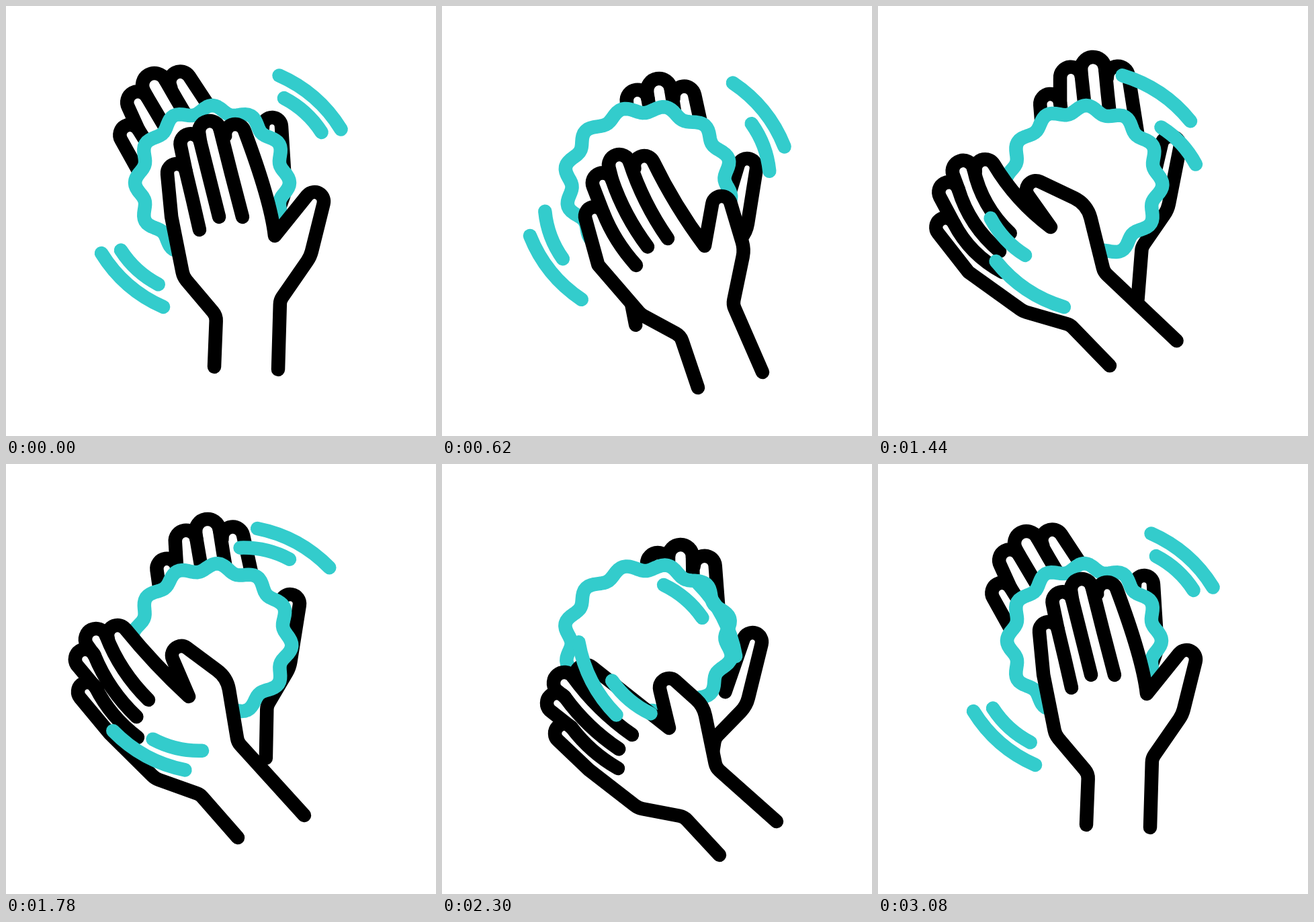
These frames come from a looping animation (640 by 640 pixels, 3.6 s). An HTML page with a canvas:

```html
<!DOCTYPE html>
<html lang="en">
<head>
<meta charset="utf-8">
<title>Washing hands</title>
<style>
html, body { margin: 0; width: 100%; height: 100%; overflow: hidden; background: #fff; }
canvas { display: block; width: 640px; height: 640px; }
</style>
</head>
<body>
<canvas id="stage" width="640" height="640"></canvas>
<script>
const ctx = document.getElementById('stage').getContext('2d');
const LOOP = 3600, MOVE = 3080;
const TEAL = '#33cccc', RAD = Math.PI / 180;

// Every track has one row per pose; the last time returns to the first row.
const TIMES = [0, 620, 1100, 1780, 2300, 2760, MOVE];

// left wrist, left corner, palm corner, right corner, right wrist
const palm = [
  [310,537, 313,461, 264,403, 408,438, 405,541],
  [381,568, 355,491, 296,459, 433,444, 477,545],
  [372,542, 315,483, 244,466, 363,408, 470,501],
  [345,556, 289,492, 222,468, 345,414, 444,523],
  [413,582, 360,525, 292,512, 408,452, 498,532],
  [364,567, 352,492, 290,447, 440,455, 457,551]
];
// tips of pinky, middle, index; their ends; bulge of edge, fingers, index
const fingers = [
  [254,249, 303,187, 341,191, 288,333, 352,314, 400,342, 12,0,6],
  [227,313, 264,237, 301,238, 289,386, 336,346, 391,357, 26,9,-7],
  [120,344, 158,257, 192,257, 211,408, 224,352, 283,341, 28,20,-18],
  [121,339, 134,261, 166,255, 196,407, 212,351, 272,346, 12,12,-5],
  [182,401, 182,326, 214,314, 262,453, 283,403, 338,393, 12,10,0],
  [248,298, 283,224, 322,225, 300,373, 358,341, 411,358, 11,1,6]
];
// tip, base
const thumb = [
  [459,291, 453,373], [416,297, 450,362], [259,291, 335,306],
  [261,285, 329,318], [338,333, 389,360], [457,297, 467,395]
];

// Back hand: fixed shape around the middle fingertip
const backPalm = [-77,342, -80,300, -70,250, 56,269, 45,346];
const backFingers = [-67,48, 0,0, 36,14, -45,150, 25,140, 70,200, 12,0,0];
// middle tip, turn, thumb tip
const back = [
  [221,118, -28, 396,180], [323,126, -7, 454,241], [345,129, 0, 454,251],
  [300,100, -7, 423,208], [355,138, 1, 462,265], [267,115, -18, 426,200]
];

const foamTurn = [[0], [12], [2], [4], [13], [0]];

// distance, bearing, tilt
const outer = [[187,135,41], [189,143,51], [100,129,45],
  [185,125.5,28.5], [99,153.8,62.6], [180,182.4,102.7]];
const inner = [[166,137,42.3], [167,157,69.4], [82.4,186,83],
  [156.6,114.5,13.1], [81,118.3,40.4], [165,166.2,81]];

// Smooth curve through a track, at rest on both ends
function at(track, t) {
  const last = TIMES.length - 1;
  let i = 0;
  while (i < last - 1 && t >= TIMES[i + 1]) i++;
  const row = k => track[k % track.length];
  const span = TIMES[i + 1] - TIMES[i];
  const u = Math.min(1, (t - TIMES[i]) / span), v = 1 - u;
  const slope = (k, j) => k === 0 || k === last ? 0 :
    (row(k + 1)[j] - row(k - 1)[j]) / (TIMES[k + 1] - TIMES[k - 1]);
  return row(i).map((p, j) =>
    v * v * (1 + 2 * u) * p + u * u * (3 - 2 * u) * row(i + 1)[j] +
    span * u * v * (v * slope(i, j) - u * slope(i + 1, j)));
}

// Swell between pose k and the next one
function hump(t, k) {
  const u = (t - TIMES[k]) / (TIMES[k + 1] - TIMES[k]);
  return u > 0 && u < 1 ? Math.sin(Math.PI * u) ** 2 : 0;
}

const pairs = list => Array.from({ length: Math.floor(list.length / 2) },
  (_, i) => [list[2 * i], list[2 * i + 1]]);

// Midpoint of a and b, shifted along the line and sideways
function between(a, b, along, side) {
  const dx = b[0] - a[0], dy = b[1] - a[1], d = Math.hypot(dx, dy);
  return [(a[0] + b[0]) / 2 + (dx * along + dy * side) / d,
    (a[1] + b[1]) / 2 + (dy * along - dx * side) / d];
}

function build(palmRow, fingerRow, thumbRow) {
  const [wristL, cornerL, heel, cornerR, wristR] = pairs(palmRow);
  const [pinky, middle, index, endP, endM, crease] = pairs(fingerRow);
  const [edge, bow, indexBow] = fingerRow.slice(12);
  const ring = between(pinky, middle, 7.5, 11), endR = between(endP, endM, 0, 10);
  const finger = (top, end) => ({ top, end, bend: between(top, end, 0, 7.5 - bow) });
  const bend = between(index, crease, Math.max(0, 5 * indexBow), 7.5 + indexBow);
  const [thumbTip, thumbBase] = pairs(thumbRow);
  return {
    wristL, cornerL, heel, cornerR, wristR, thumbTip, thumbBase,
    edge: between(pinky, heel, -13, -edge),
    fingers: [finger(pinky, endP), finger(ring, endR), finger(middle, endM),
      { top: index, end: crease, bend }]
  };
}

// Heading from p along the tangent of a fingertip circle
function aim(p, c, r, side) {
  const dx = c[0] - p[0], dy = c[1] - p[1];
  return Math.atan2(dy, dx) + side * Math.asin(Math.min(1, r / Math.hypot(dx, dy)));
}

function tip(c, r, from, to) {
  const end = aim(to, c, r, 1) + Math.PI / 2;
  ctx.arc(c[0], c[1], r, aim(from, c, r, -1) - Math.PI / 2, end);
  return [c[0] + r * Math.cos(end), c[1] + r * Math.sin(end)];
}

function drawHand(h, radii) {
  const gaps = [];
  let from = h.edge;
  ctx.beginPath();
  ctx.moveTo(...h.wristL);
  ctx.arcTo(...h.cornerL, ...h.heel, 20);
  ctx.arcTo(...h.heel, ...h.edge, 28);
  ctx.lineTo(...h.edge);
  h.fingers.forEach((f, i) => {
    const side = tip(f.top, radii[i], from, f.bend);
    gaps.push([side, f.bend, f.end]);
    from = f.bend;
  });
  const [, bend, crease] = gaps.pop();
  ctx.quadraticCurveTo(...bend, ...crease);
  tip(h.thumbTip, 14, crease, h.thumbBase);
  ctx.arcTo(...h.thumbBase, ...h.cornerR, 45);
  ctx.arcTo(...h.cornerR, ...h.wristR, 20);
  ctx.lineTo(...h.wristR);
  ctx.fill();
  ctx.strokeStyle = '#000';
  ctx.stroke();
  ctx.beginPath();
  for (const [a, b, c] of gaps) {
    ctx.moveTo(...a);
    ctx.quadraticCurveTo(...b, ...c);
  }
  ctx.stroke();
}

function drawBack(t) {
  const [x, midY, turn, tx, ty] = at(back, t);
  const lift = 6 * hump(t, 0) + 18 * hump(t, 3 - 1);
  const y = midY - lift;
  const c = Math.cos(turn * RAD), s = Math.sin(turn * RAD);
  const place = list => pairs(list).flatMap(([a, b]) => [x + a * c - b * s, y + a * s + b * c]);
  const tips = [...place(backFingers.slice(0, 12)), ...backFingers.slice(12)];
  const ty2 = ty - lift;
  drawHand(build(place(backPalm), tips, [tx, ty2, tx - 8 - turn, ty2 + 95]), [15, 16, 18, 16]);
}

function drawFront(t) {
  const a = hump(t, 1), b = hump(t, 2);
  ctx.save();
  ctx.translate(6 * a - 8 * b, 11 * a - 10 * b);
  drawHand(build(at(palm, t), at(fingers, t), at(thumb, t)), [14, 15, 16, 15]);
  ctx.restore();
}

function drawFoam(t) {
  const [turn] = at(foamTurn, t), wide = 1 + turn / 130;
  ctx.beginPath();
  for (let d = 0; d < 360; d += 2) {
    const r = 109.5 + 5.5 * Math.cos(12 * d * RAD), a = (d + turn) * RAD;
    ctx.lineTo(307 + wide * r * Math.cos(a), 263 + r * Math.sin(a));
  }
  ctx.closePath();
  ctx.fill();
  ctx.strokeStyle = TEAL;
  ctx.stroke();
}

// A curved dash and its twin across the centre
function drawDashes(track, half, bulge, t) {
  const [dist, bearing, tilt] = at(track, t);
  const swell = 20 * hump(t, 1) + 25 * hump(t, 2);
  for (const flip of [0, 180]) {
    ctx.save();
    ctx.translate(320.3, 275.7);
    ctx.rotate((bearing + flip) * RAD);
    ctx.translate(dist + swell, 0);
    ctx.rotate((tilt - bearing) * RAD);
    ctx.beginPath();
    ctx.moveTo(-half, 0);
    ctx.quadraticCurveTo(0, 2 * bulge, half, 0);
    ctx.stroke();
    ctx.restore();
  }
}

function frame(now) {
  const t = Math.min(now % LOOP, MOVE);
  ctx.fillStyle = '#fff';
  ctx.fillRect(0, 0, 640, 640);
  ctx.lineWidth = 20.5;
  ctx.lineCap = ctx.lineJoin = 'round';
  drawBack(t);
  drawFoam(t);
  drawFront(t);
  ctx.strokeStyle = TEAL;
  drawDashes(outer, 61, 9.5, t);
  drawDashes(inner, 37.7, 5, t);
}

let start;
function tick(now) {
  if (start === undefined) start = now;
  frame(now - start);
  requestAnimationFrame(tick);
}
frame(0);
requestAnimationFrame(tick);
</script>
</body>
</html>
```
